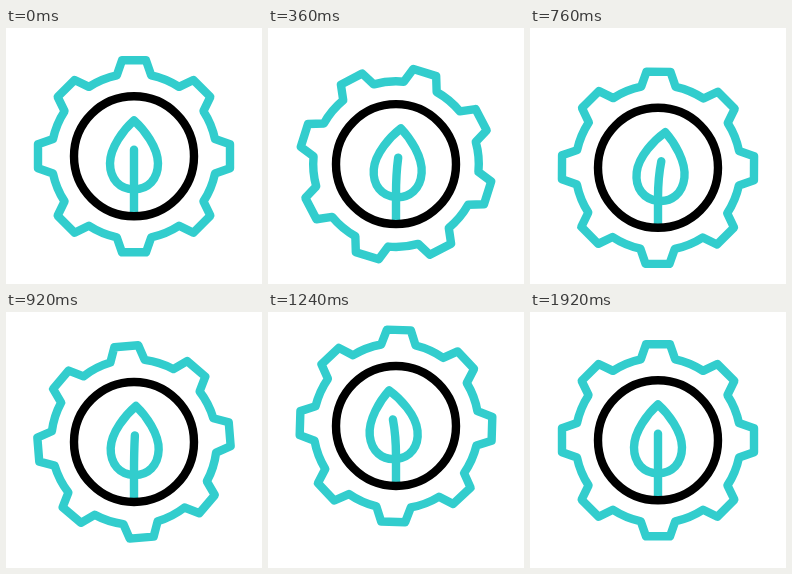
An HTML page with a canvas for the animation above (2000 ms loop, 256 by 256 pixels).

```html
<!DOCTYPE html>
<html lang="en">
<head>
<meta charset="utf-8">
<title>Gear and leaf</title>
<style>
  html, body { margin: 0; width: 100%; height: 100%; overflow: hidden; background: #fff; }
  canvas { display: block; width: 100vmin; height: 100vmin; }
</style>
</head>
<body>
<canvas width="256" height="256"></canvas>
<script>
const canvas = document.querySelector('canvas');
const ctx = canvas.getContext('2d');
const LOOP = 2000, STEP = 40;
const TEAL = '#32cdcd';
const rad = deg => deg * Math.PI / 180;

// Keyframes as [time, value]
const bob = [[80, 0], [620, 14.8], [1260, -14.4], [1920, 0]];
const swing = [[80, 0], [400, 18.1], [920, -4.6], [1400, 3.8], [1900, 0]];
const sway = [[80, 0], [620, 8], [1260, -6], [1920, 0]];

function tween(keys, t) {
  if (t <= keys[0][0]) return keys[0][1];
  for (let i = 1; i < keys.length; i++) {
    const [t0, a] = keys[i - 1], [t1, b] = keys[i];
    if (t < t1) {
      const u = (t - t0) / (t1 - t0);
      return a + (b - a) * (1 - Math.cos(Math.PI * u)) / 2;
    }
  }
  return keys[keys.length - 1][1];
}

function gear(angle) {
  const root = 82.8, tip = 96, half = 12, spread = rad(12);
  ctx.save();
  ctx.rotate(rad(angle));
  ctx.beginPath();
  for (let i = 0; i < 8; i++) {
    const a = i * Math.PI / 4, c = Math.cos(a), s = Math.sin(a);
    ctx.lineTo(tip * c + half * s, tip * s - half * c);
    ctx.lineTo(tip * c - half * s, tip * s + half * c);
    ctx.arc(0, 0, root, a + spread, a + Math.PI / 4 - spread);
  }
  ctx.closePath();
  ctx.stroke();
  ctx.restore();
}

function leaf(angle) {
  const base = 30;
  ctx.save();
  ctx.translate(0, base);
  ctx.rotate(rad(angle));
  ctx.translate(0, -base);
  ctx.beginPath();
  ctx.moveTo(0, -36);
  ctx.bezierCurveTo(10, -27, 24, -9, 24, 7);
  ctx.bezierCurveTo(24, 23, 14, 33, 0, 33);
  ctx.bezierCurveTo(-14, 33, -24, 23, -24, 7);
  ctx.bezierCurveTo(-24, -9, -10, -27, 0, -36);
  ctx.closePath();
  ctx.stroke();
  ctx.restore();

  // The stem stays upright below and bends with the leaf above
  ctx.beginPath();
  ctx.moveTo(0, 57);
  ctx.lineTo(0, base);
  ctx.quadraticCurveTo(0, 10, 37 * Math.sin(rad(angle)) * 0.8, -6.5);
  ctx.stroke();
}

function ring() {
  ctx.beginPath();
  ctx.arc(0, 0, 60, 0, 2 * Math.PI);
  ctx.stroke();
}

function draw(t) {
  const scale = canvas.width / 256;
  ctx.setTransform(scale, 0, 0, scale, 0, 0);
  ctx.fillStyle = '#fff';
  ctx.fillRect(0, 0, 256, 256);
  ctx.translate(128, 128.3 + tween(bob, t));
  ctx.lineWidth = 8.4;
  ctx.lineCap = ctx.lineJoin = 'round';
  ctx.strokeStyle = TEAL;
  gear(tween(swing, t));
  leaf(tween(sway, t));
  ctx.strokeStyle = '#000';
  ring();
}

const start = performance.now();
function tick() {
  const t = Math.max(0, performance.now() - start) % LOOP;
  draw(Math.floor(t / STEP) * STEP);
  requestAnimationFrame(tick);
}
tick();
</script>
</body>
</html>
```
